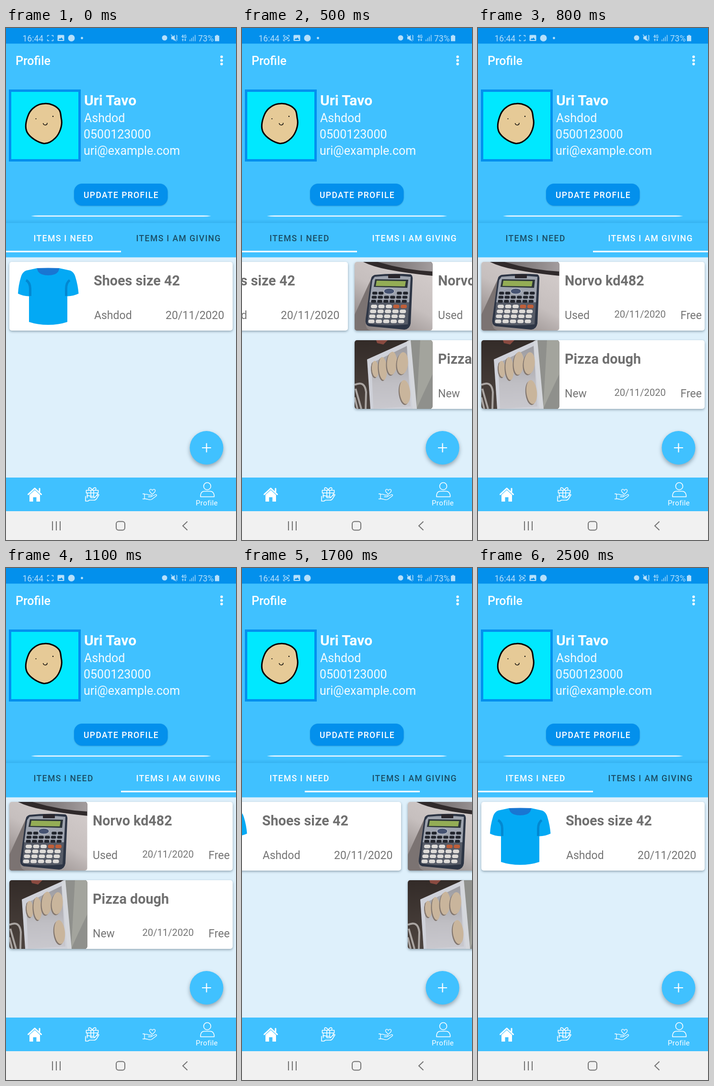
Animation of 480x1066 px, one loop 2600 ms. Source, as an HTML page:

```html
<!DOCTYPE html>
<html lang="en">
<head>
<meta charset="utf-8">
<title>Profile</title>
<style>
html, body { margin: 0; width: 100%; height: 100%; overflow: hidden; background: #def0fb; }
svg { display: block; width: 480px; height: 1066px; font-family: Roboto, "Noto Sans", sans-serif; }
.line { fill: none; stroke: #fff; stroke-width: 1.6; stroke-linecap: round; stroke-linejoin: round; }
.caps { font-size: 17.5px; font-weight: 500; letter-spacing: 1.4px; fill: #fff; }
.info { font-size: 25px; fill: #f4fbff; }
.head { font-size: 28.75px; font-weight: 700; fill: #707070; }
.note { font-size: 23px; fill: #757575; }
.date { font-size: 20.2px; fill: #757575; }
.card { fill: #fff; filter: drop-shadow(0 2px 2.5px rgba(0,30,50,.36)); }
.status { fill: #b5e0fb; font-size: 17.5px; }
.status .line { stroke: #b5e0fb; stroke-width: 1.3; }
</style>
</head>
<body>
<svg viewBox="0 0 480 1066">
  <defs>
    <clipPath id="photoClip"><rect width="162.5" height="143" rx="5"/></clipPath>
    <linearGradient id="table" x1=".8" x2=".2" y2="1">
      <stop stop-color="#d3cccb"/><stop offset=".5" stop-color="#c6bfbe"/><stop offset="1" stop-color="#8c8483"/>
    </linearGradient>
    <linearGradient id="laptop">
      <stop stop-color="#6d6768"/><stop offset="1" stop-color="#a39d9e"/>
    </linearGradient>
    <linearGradient id="floor" x2="0" y2="1">
      <stop stop-color="#332b28"/><stop offset="1" stop-color="#4d443f"/>
    </linearGradient>
    <linearGradient id="trayFloor" x2="0" y2="1">
      <stop stop-color="#9c9ba0"/><stop offset=".6" stop-color="#c0bfc4"/><stop offset="1" stop-color="#c9c8ce"/>
    </linearGradient>
    <linearGradient id="edge" x2="0" y2="1">
      <stop stop-color="#0068a8" stop-opacity="0"/><stop offset="1" stop-color="#0068a8" stop-opacity=".16"/>
    </linearGradient>
  </defs>

  <rect width="480" height="1066" fill="#def0fb"/>

  <g id="pages">
    <g id="need">
      <rect class="card" x="7" y="487" width="466" height="143" rx="5"/>
      <path fill="#03a9f4" d="M65 500Q88 508 111 500L134 505Q142 508 145 519Q150 535 151.500 553Q141 558 128 558.500V612Q110 618 88 618T48 612V558.500Q35 558 25 553Q26 535 31 519Q34 508 42 505Z"/>
      <path fill="#1976d2" d="M65 500Q88 499 111 500Q110 515 88 515T65 500Z"/>
      <path fill="none" stroke="#0288d1" stroke-width="5" d="M42 525Q50.500 530 50.500 543V558M133 525Q125.500 530 125.500 543V558"/>
      <text class="head" x="183" y="536">Shoes size 42</text>
      <text class="note" x="184" y="606">Ashdod</text>
      <text class="note" x="333" y="606">20/11/2020</text>
    </g>
    <g id="giving" transform="translate(480 0)"></g>
  </g>

  <g id="fab">
    <circle cx="418.500" cy="874" r="35" fill="#40c1ff" style="filter:drop-shadow(0 4px 4px rgba(0,30,50,.36))"/>
    <path class="line" style="stroke-width:2.2;stroke-linecap:butt" d="M409 874H428M418.500 864.500V883.500"/>
  </g>

  <g id="header">
    <rect width="480" height="477.500" fill="#40c1ff"/>
    <rect width="480" height="32.500" fill="#0390ec"/>
    <text x="20" y="77" font-size="25" font-weight="500" fill="#fff">Profile</text>
    <g fill="#fff"><circle cx="450" cy="60" r="2.700"/><circle cx="450" cy="67.500" r="2.700"/><circle cx="450" cy="75" r="2.700"/></g>

    <rect x="8.500" y="130.500" width="145" height="145" fill="#00e8ff" stroke="#0390ee" stroke-width="5"/>
    <path fill="#e6ca97" stroke="#000" stroke-width="3" d="M80 157.500C92 156.500 106 162 112 172C115 178 114 184 116 192C117.500 204 112 220 103 229C96 236 88 241 79 240.500C66 238 50 228 44 217C39 207 42 192 47 180C52 168 66 157.500 80 157.500Z"/>
    <circle cx="62.500" cy="189" r="1.100"/><circle cx="98" cy="184" r="1.200"/>
    <path fill="none" stroke="#000" stroke-width="1.400" d="M77.500 198Q78 202 82 202T86 197.500"/>

    <text x="163" y="160.500" font-size="30" font-weight="700" fill="#fff">Uri Tavo</text>
    <text class="info" x="163" y="196">Ashdod</text>
    <text class="info" x="162" y="230">0500123000</text>
    <text class="info" x="162" y="264">uri@example.com</text>

    <rect x="142" y="324" width="195.500" height="46" rx="17" fill="#0390ec" style="filter:drop-shadow(0 1px 1px rgba(0,40,80,.25))"/>
    <text class="caps" x="162" y="353.500">UPDATE PROFILE</text>
    <path fill="#f0faff" d="M52 391.500Q60 390.300 68 390.300H412Q420 390.300 428 391.500Q420 392.700 412 392.700H68Q60 392.700 52 391.500Z"/>
    <rect y="398" width="480" height="8" fill="url(#edge)"/>
    <text class="caps" id="tabNeed" x="57.500" y="444">ITEMS I NEED</text>
    <text class="caps" id="tabGiving" x="271.500" y="444">ITEMS I AM GIVING</text>
    <rect id="bar" y="463.800" width="240" height="3.200" fill="#fff"/>
  </g>

  <g class="status">
    <text x="34.500" y="27.500">16:44</text>
    <path class="line" d="M86.500 18V15.500H89.500M95.500 15.500H98.500V18M98.500 24V26.500H95.500M89.500 26.500H86.500V24"/>
    <g id="cam"><rect x="88.500" y="18.500" width="5.500" height="5" rx="1" class="line"/><path d="M94 21L97 18.500V23.500Z"/></g>
    <path fill-rule="evenodd" d="M109 14.500H120Q121.500 14.500 121.500 16V25.500Q121.500 27 120 27H109Q107.500 27 107.500 25.500V16Q107.500 14.500 109 14.500ZM109.500 25H119.500L116 19.500L113.500 22.500L112 21Z"/>
    <circle cx="136.500" cy="21" r="7"/>
    <circle id="dot" cx="158.500" cy="21" r="2.400"/>
    <circle cx="331" cy="20.500" r="5.500"/>
    <path d="M345 18H348L352 14.500V27L348 23.500H345Z"/>
    <path class="line" d="M344.500 14L355 27M355.500 15L357.500 17L355.500 19L357.500 21L355.500 23L357.500 25"/>
    <text x="366" y="20.500" font-size="8.500" font-weight="700">4G</text>
    <path d="M367 25L369 22L371 25H369.700V27.500H368.300V25ZM372 24.500H373.300V22H374.700V24.500H376L374 27.500Z"/>
    <path class="line" d="M384 24.500V27M387.500 21.500V27M391 18.500V27M394.700 15V27"/>
    <text x="401" y="27.500">73%</text>
    <path d="M438.500 14.500H442.500V16H445V27.500H436V16H438.500Z"/>
  </g>

  <g id="bottom">
    <rect y="936" width="480" height="70" fill="#40c1ff"/>
    <path fill="#fff" d="M60 962L71 972V986H63.500V977H56.500V986H49V972Z"/>
    <path class="line" style="stroke-width:3" d="M46.500 971L60 958.500L73.500 971M70 959V965"/>
    <path class="line" d="M167.500 962.500H192.500V968H167.500ZM169.500 968V978M190.500 968V974M177 962.500V978M183 962.500V974M180 962C176 955 170 956 173 962M180 962C184 955 190 956 187 962M166 975V985H171L174 983H184Q187 983 189 980L194 972Q193 969.500 190 972L185 978H178M185 978Q184 974.500 180 975H176Q173 972.500 169 974.500"/>
    <path class="line" style="stroke-width:1.300" d="M305.500 971L300.500 966Q298 962 301.500 960.500Q304 960 305.500 963Q307 960 309.500 960.500Q313 962 310.500 966ZM285.500 970H289V980.500H285.500M289 971.500Q294 969.500 298 972.500H303Q306 974 303 976H297M304.500 975L312 971.500Q315.500 971 314 974L304 981.500Q300 983 295 981L289 980"/>
    <circle class="line" cx="420" cy="954" r="7.500"/>
    <path class="line" d="M406 976V973Q407 964.500 414 964.500H426Q433 964.500 434.500 973V976Z"/>
    <text x="396" y="994" font-size="15" letter-spacing=".4" fill="#fff">Profile</text>
    <rect y="1006" width="480" height="60" fill="#f1f1f1"/>
    <g fill="none" stroke="#747474" stroke-width="2">
      <path d="M97 1027V1046M105 1027V1046M113 1027V1046M378.500 1027.500L369 1036.500L378.500 1045.500"/>
      <rect x="230" y="1027.500" width="18" height="18" rx="5"/>
    </g>
  </g>
</svg>

<script>
const byId = id => document.getElementById(id);
const rect = (x, y, w, h, fill, rx = 0) =>
  `<rect x="${x}" y="${y}" width="${w}" height="${h}" rx="${rx}" fill="${fill}"/>`;
const shape = (d, fill) => `<path d="${d}" fill="${fill}"/>`;
const ellipse = (x, y, rx, ry, tilt, fill) =>
  `<ellipse rx="${rx}" ry="${ry}" fill="${fill}" transform="translate(${x} ${y}) rotate(${tilt})"/>`;
const dough = (x, y, rx, ry, tilt) =>
  ellipse(x - 2, y + 2, rx, ry, tilt, "#82766e") + ellipse(x, y, rx, ry, tilt, "#c9b59c");

function calculator() {
  let keys = "";
  for (let row = 0; row < 3; row++)
    for (let col = 0; col < 6; col++)
      if (row || col < 2 || col > 3)
        keys += rect(37 + col * 12.8 - row * 1.3, 62 + row * 8.5, 10.5, 6, "#23262e", 2.5);
  for (let row = 0; row < 4; row++)
    for (let col = 0; col < 5; col++)
      keys += rect(34 + col * 15.5 - row * 1.8, 89 + row * 10.3, 13, 7.5, !row && col > 2 ? "#c05f39" : "#dedbd8", 3.5);
  return rect(0, 0, 163, 143, "url(#table)") +
    shape("M18 0H163V29Q112 24 70 16Q38 10 18 0Z", "#302a2b") +
    shape("M48 0H163V20Q105 17 48 0Z", "url(#laptop)") +
    shape("M36 32L24 120Q20 140 34 143H0V110Z", "#7b7372") +
    shape("M42 27Q80 23 117 26Q122 28 121 38L117 128Q115 140 104 141L30 134Q21 131 23 119L34 37Q35 29 42 27Z", "#2d3545") +
    shape("M42 31Q80 27 117 31L114 84H31L37 38Z", "#9ea3ae") +
    shape("M31 84H114L111 130Q66 135 27 128Z", "#565b67") +
    rect(70, 26, 25, 8, "#2a262c", 1) +
    shape("M43 36L112 37L110 54L40 52Z", "#2c3438") +
    shape("M46 39L107 40L105 51L44 50Z", "#94ad55") +
    `<ellipse cx="72" cy="61" rx="11" ry="6" fill="#465372" stroke="#cdd1d8"/>` + keys;
}

function tray() {
  return rect(0, 0, 163, 143, "url(#floor)") +
    shape("M45 0H69L60 9L47 6Z", "#8a4a40") +
    `<path fill="none" stroke="#aaa5a2" stroke-width="4" d="M0 93Q21 83 24 108L23 143M2 101L14 143M0 119L6 143"/>` +
    shape("M112 0H163V143H120Z", "#8f908c") +
    shape("M137 0L163 0V70L144 110L129 143Z", "#a3a49d") +
    shape("M26 40L113 1L125 143H33Z", "#cfd1d9") +
    shape("M35 48L109 12L117 138L39 143Z", "url(#trayFloor)") +
    dough(43, 60, 7, 17, -4) + dough(59, 59, 8.5, 24, -4) + dough(78, 48, 10.5, 24, 3) +
    dough(100, 48, 11.5, 23, 5) + dough(105, 108, 11, 25, -6) +
    shape("M109 2L117 0L130 143H121Z", "#d5d7dc");
}

const item = (y, photo, title, state) => `
  <g transform="translate(0 ${y})">
    <rect class="card" x="7" width="466" height="143" rx="5"/>
    <g transform="translate(7 0)" clip-path="url(#photoClip)">${photo}</g>
    <text class="head" x="181" y="49">${title}</text>
    <text class="note" x="181" y="119">${state}</text>
    <text class="date" x="284.500" y="116">20/11/2020</text>
    <text class="note" x="422.500" y="119">Free</text>
  </g>`;

byId("giving").innerHTML =
  item(487, calculator(), "Norvo kd482", "Used") +
  item(650, tray(), "Pizza dough", "New");

// From each step on: [step, page scroll, tab bar x]
const STEP = 100, LOOP = 2600;
const moves = [
  [0, 0, 0], [5, 252, 0], [6, 419, 110], [7, 470, 222], [8, 480, 240],
  [16, 434, 240], [17, 141, 131], [18, 32, 18], [19, 0, 0]
];

function draw(time) {
  const step = Math.floor((time % LOOP) / STEP);
  const [, scroll, barX] = moves.findLast(move => move[0] <= step);
  const onGiving = step >= 5 && step < 16;
  const blink = step % 10;
  byId("pages").setAttribute("transform", `translate(${-scroll} 0)`);
  byId("bar").setAttribute("x", barX);
  byId("tabNeed").style.fill = onGiving ? "#1a4d66" : "#fff";
  byId("tabGiving").style.fill = onGiving ? "#fff" : "#1a4d66";
  byId("cam").style.opacity = blink >= 3 && blink < 8 ? 1 : 0;
  byId("dot").style.opacity = step < 12 ? 1 : 0;
}

const start = performance.now();
function tick() {
  draw(performance.now() - start);
  requestAnimationFrame(tick);
}
tick();
</script>
</body>
</html>
```
